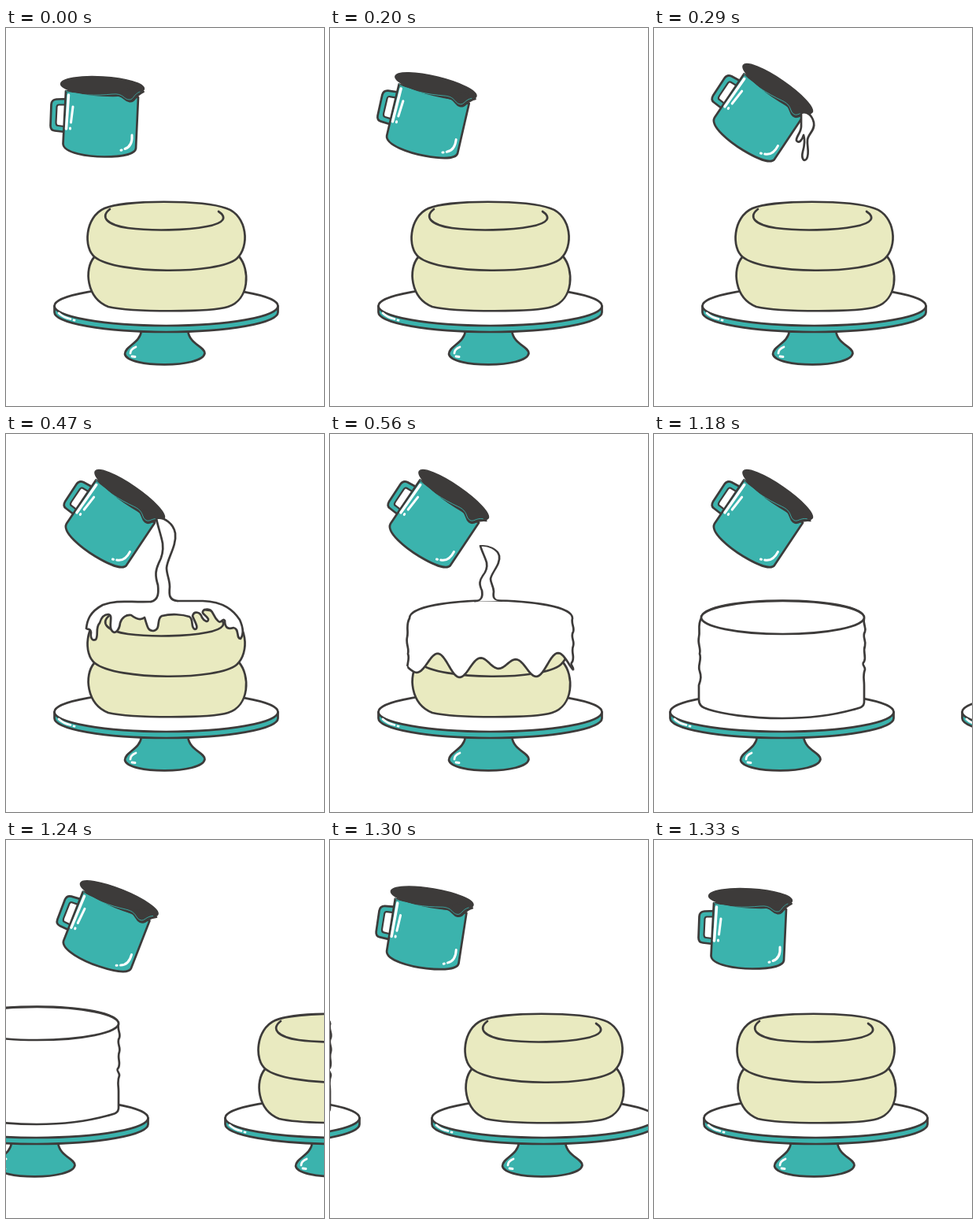
These frames come from a looping animation (404 by 480 pixels, 1360 ms). An HTML page with a canvas:

```html
<!DOCTYPE html>
<html lang="en">
<head>
<meta charset="utf-8">
<title>Icing a cake</title>
<style>
  html, body { margin: 0; width: 100%; height: 100%; overflow: hidden; background: #fff; }
  canvas { display: block; }
</style>
</head>
<body>
<canvas width="404" height="480"></canvas>
<script>
const ctx = document.querySelector('canvas').getContext('2d');
const LOOP = 1360, STEP = 30;
const DARK = '#3d3b3a', TEAL = '#3bb3ad', CREAM = '#e9eac0', WHITE = '#fff';
const clamp01 = v => Math.min(1, Math.max(0, v));
const mix = (a, b, p) => a + (b - a) * p;
const path = d => new Path2D(d);

const mug = {
  handle: path('M77 90L64 90.5Q58 91 57.5 97L56.5 124Q56.5 130 62 130.5L75 132Z'),
  hole: path('M76 97.5L67 97.5Q65 97.5 64.5 100L63.5 120Q63.5 124 66 124L74 125Z'),
  body: path('M76 80L72.5 147C73 159 105 163.5 125 163.5C148 163.5 164 160 165 153L168 88Z'),
  edgeShine: path('M79.5 85L76.5 128'),
  shine: path('M85 100L82.5 120M81.5 127V128M160 136Q161 150 151 153.5M147 155L146 155.3'),
  spout: path('M138 85C150 85 150 93 157 93.5C165 94 163 86 175 81L160 76Z'),
  lip: path('M76 80C90 86 115 86 135 84C150 82.5 149 91 157 91C162 91 162 84 170 81'),
};

const stand = {
  foot: path('M172 384C171 400 151 404 151 414C154 432 250 432 252.5 413C252 404 233 402 231 384Z'),
  rim: path('M61.5 353V361A142 25 0 0 0 345.5 361V353Z'),
  top: path('M61.5 353A142 25 0 0 1 345.5 353A142 25 0 0 1 61.5 353Z'),
  shine: path('M67 362Q72 367 82 369.5M86 371L87 371.2M165 405Q158 408 158 413M160 417L164 417.5'),
};

const sponge = {
  lower: path('M112 291C99 306 102 343 130 354C160 361 260 361 282 354C310 345 310 306 296 290Z'),
  upper: path('M113 291C98 280 100 240 125 229C150 218 250 218 280 229C307 238 310 278 293 293C270 313 140 313 113 291Z'),
  hollow: path('M132 230C119 240 128 250 155 254C185 258 230 257 255 252C278 248 281 240 270 233'),
};

const splash = path('M187 108C194 105 201 111 203 120C205 130 196 134 195 142C194 150 198 158 194 166C190 171 187 165 189 157C191 150 192 142 190 136C188 143 184 147 181 143C180 138 187 133 187 125Z');
const stream = path('M184 213C194 211 194 201 193 192C189 179 190 173 194 164C199 155 200 148 199 139C197 128 193 118 191 107C201 105 213 114 215 126C217 142 205 158 204 170C204 178 208 185 208 194C207 204 207 211 218 212');
const puddle = path('M184 213C155 214 142 210 123 217C106 226 103 237 102 247C105 249 107 246 108 252C107 260 110 263 114 261C118 256 113 246 119 240C121 233 124 229 130 229C137 230 130 242 134 249C138 256 144 249 145 240C147 233 153 229 159 230C164 234 171 237 176 233C180 245 180 250 187 250C198 248 190 235 198 231C210 228 224 229 233 232C239 236 234 246 240 248C246 247 239 237 237 231C239 224 247 226 249 233C252 238 257 240 257 235C254 229 246 228 252 223C264 220 262 231 269 237C273 242 275 233 278 237C278 247 283 248 289 246C297 247 292 260 298 260C303 253 301 245 297 236C289 224 277 213 250 212L218 212');

const iced = path('M101 234C101 204 308 204 308 234C306 241 311 245 309 251C305 258 311 262 309 269C306 277 311 282 308 289C304 293 309 294 309 299C306 307 308 311 308 319L308 340C308 347 302 348 294 350C265 358 238 361 204 361C160 361 127 355 111 350C101 347 98 344 98 337L98 319C101 311 101 307 99 301C96 294 102 287 99 279C101 272 96 267 98 258C100 250 96 243 101 234Z');
const icedRim = path('M101 233A103.5 21 0 0 0 308 233A103.5 21 0 0 0 101 233Z');

function draw(shape, fill, line = DARK, width = 2.7) {
  if (fill) { ctx.fillStyle = fill; ctx.fill(shape); }
  if (line) { ctx.strokeStyle = line; ctx.lineWidth = width; ctx.stroke(shape); }
}

function isolated(paint) {
  ctx.save();
  paint();
  ctx.restore();
}

function drawMug(tilt) {
  isolated(() => {
    ctx.translate(120 + 15.5 * tilt, 112 - 3.5 * tilt);
    ctx.rotate(tilt * 31 * Math.PI / 180);
    ctx.translate(-120, -112);
    draw(mug.handle, TEAL);
    draw(mug.hole, WHITE, DARK, 2.2);
    draw(mug.body, TEAL);
    draw(mug.edgeShine, null, WHITE, 3.5);
    draw(mug.shine, null, WHITE, 3);
    const rim = new Path2D();
    rim.ellipse(122.5, 74, 53, 12, 0.06, 0, 7);
    draw(rim, DARK, DARK, 1.5);
    draw(mug.spout, DARK, DARK, 2);
    draw(mug.lip, null, TEAL, 0.8);
  });
}

function drawStand() {
  draw(stand.foot, TEAL);
  draw(stand.rim, TEAL);
  draw(stand.top, WHITE);
  draw(stand.shine, null, WHITE, 2.8);
}

function drawSponge() {
  draw(sponge.lower, CREAM);
  draw(sponge.upper, CREAM);
  draw(sponge.hollow);
}

function drawIced() {
  draw(iced, WHITE);
  draw(icedRim, WHITE);
}

// Icing running down the sides, bounded below by a wavy front.
function drawFlow(progress) {
  const front = new Path2D();
  for (let x = 92; x <= 316; x += 2) {
    front.lineTo(x, mix(255, 352, progress) + 10 * Math.sin(x / 8) + 6 * Math.sin(x / 13 + 1));
  }
  const covered = new Path2D(front);
  covered.lineTo(316, 200);
  covered.lineTo(92, 200);
  isolated(() => {
    ctx.clip(covered);
    draw(iced, WHITE);
    if (progress > 0.7) draw(icedRim);
  });
  isolated(() => {
    ctx.clip(iced);
    draw(front);
  });
  const opening = 1 - progress * 2.5;
  if (opening > 0) {
    const hollow = new Path2D();
    hollow.ellipse(204, 241, 66 * opening, 13 * opening, 0, 0, 7);
    draw(hollow, CREAM);
  }
}

function drawPuddle(spread) {
  isolated(() => {
    ctx.translate(200, 212);
    ctx.scale(spread, mix(0.4, 1, spread));
    ctx.translate(-200, -212);
    draw(puddle, WHITE);
  });
}

// The last of the stream sinks towards the cake.
function drawStream(height) {
  if (height <= 0) return;
  isolated(() => {
    ctx.translate(0, 212 * (1 - height));
    ctx.scale(1, height);
    draw(stream, WHITE);
  });
}

function drawDrips(length) {
  const drip = new Path2D();
  const end = mix(90, 104, length);
  drip.moveTo(150, 86);
  drip.bezierCurveTo(153, 92, 148, end - 3, 151, end);
  drip.bezierCurveTo(155, end, 153, 94, 156, 86);
  draw(drip, WHITE, DARK, 2);
  if (length === 1) {
    draw(path('M168 102C172 107 177 107 174 113C170 119 171 122 173 122C177 121 174 114 180 111'), TEAL, DARK, 2.2);
  }
}

function drawPour(step) {
  drawStand();
  if (step >= 17) drawIced();
  else {
    drawSponge();
    if (step > 10) drawFlow((step - 11) / 5);
    else if (step > 5) drawPuddle(mix(0.3, 1, (step - 6) / 4));
  }
  drawMug(clamp01(step / 3));
  if (step === 4) draw(splash, WHITE);
  if (step > 4) drawStream(1 - clamp01((step - 12) / 3));
  if (step > 13) drawDrips(clamp01((step - 13) / 4));
}

// The finished cake leaves to the left while a plain one follows it.
const leaving = [-41, -101, -165, -236, -308, -372];
const arriving = [330, 276, 217, 144, 68, 2];

function drawChange(step) {
  const shifted = (dx, cake) => isolated(() => {
    ctx.translate(dx, 0);
    drawStand();
    cake();
  });
  shifted(leaving[step], drawIced);
  shifted(arriving[step], drawSponge);
  drawMug(1 - step / 5);
}

function render(now) {
  const t = now % LOOP;
  ctx.fillStyle = WHITE;
  ctx.fillRect(0, 0, 404, 480);
  ctx.lineJoin = ctx.lineCap = 'round';
  if (t >= 1180) drawChange(Math.min(5, Math.floor((t - 1180) / STEP)));
  else drawPour(t < 200 ? 0 : Math.min(17, Math.floor((t - 200) / STEP) + 1));
}

const start = performance.now();
function tick() {
  render(performance.now() - start);
  requestAnimationFrame(tick);
}
tick();
</script>
</body>
</html>
```
